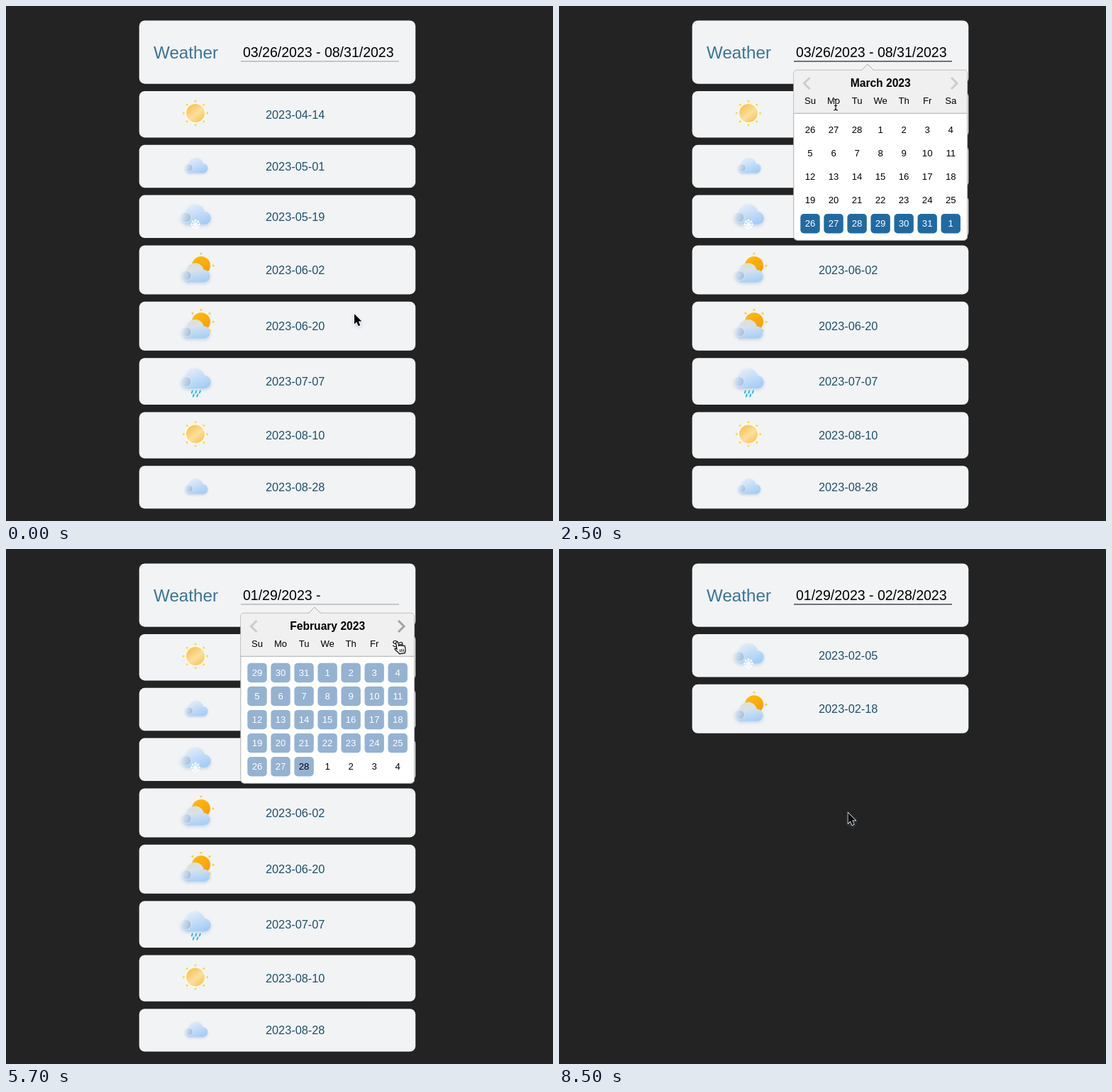
An HTML page that plays this animation: 771 by 726 pixels, repeating every 8600 ms.

```html
<!DOCTYPE html>
<html lang="en">
<head>
<meta charset="utf-8">
<title>Weather date range</title>
<style>
  html, body { margin: 0; width: 100%; height: 100%; overflow: hidden; background: #232323; }
  svg { display: block; width: 100%; height: 100%; font-family: "Liberation Sans", Arial, sans-serif; }
  .card { fill: #f1f3f5; }
  .date { font-size: 16.3px; fill: #1f5066; }
  .title { font-size: 24.2px; fill: #3a7595; }
  .range { font-size: 19.5px; }
  .month { font-size: 15.6px; font-weight: bold; text-anchor: middle; }
  .day { font-size: 13.1px; text-anchor: middle; }
  .line { fill: none; stroke: #000; }
  .shadow { filter: drop-shadow(0 2px 2px rgba(110, 150, 190, .35)); }
</style>
</head>
<body>
<svg viewBox="0 0 771 726">
  <defs>
    <linearGradient id="sunFill" x1=".1" y1="0" x2=".9" y2="1">
      <stop offset="0" stop-color="#f8bd45"/><stop offset=".55" stop-color="#fadf9f"/><stop offset="1" stop-color="#f8c04c"/>
    </linearGradient>
    <linearGradient id="hotFill" x1="0" y1="0" x2="1" y2="1">
      <stop offset="0" stop-color="#ffbe0a"/><stop offset="1" stop-color="#fd9a00"/>
    </linearGradient>
    <linearGradient id="cloudFill" x1=".2" y1="0" x2=".8" y2="1">
      <stop offset="0" stop-color="#e6eff9"/><stop offset="1" stop-color="#a0cbf6"/>
    </linearGradient>
    <linearGradient id="hazeFill" x1=".3" y1="0" x2=".6" y2="1">
      <stop offset="0" stop-color="#e2dfd0"/><stop offset=".4" stop-color="#d5e2ec"/><stop offset="1" stop-color="#a5cff8"/>
    </linearGradient>
    <linearGradient id="puffFill" x1="1" y1=".6" x2="0" y2=".3">
      <stop offset="0" stop-color="#9dbcdc"/><stop offset="1" stop-color="#dde8f2"/>
    </linearGradient>
  </defs>
  <g id="scene"></g>
</svg>
<script>
const LOOP = 8600, FRAME = 100;
const OPEN = 2000, PICK_START = 4000, PICK_END = 6900, NEXT = 4900;
const CLICKS = [1800, 2900, 3200, 3800, 4700, 6700];
const FOCUS = [[1900, 3000, 390], [PICK_START, 4800, 449.3], [PICK_END, LOOP, 547.5]];

// Pointer stops: time, x, y
const PATH = [
  [0, 491, 434], [900, 425, 80], [1100, 425, 80], [1600, 393, 72], [2000, 393, 72],
  [2500, 390, 138], [2850, 350, 108], [3400, 350, 108], [3750, 357, 300], [3900, 357, 300],
  [4100, 357, 184], [4200, 405, 167], [4600, 557, 108], [5600, 557, 108], [5700, 553, 130],
  [6400, 426, 301], [7300, 426, 301], [8000, 440, 250], [8100, 440, 250], [8500, 407.5, 372]
];

const BEFORE = [
  ['sun', '2023-04-14'], ['cloud', '2023-05-01'], ['snow', '2023-05-19'], ['partly', '2023-06-02'],
  ['bright', '2023-06-20'], ['rain', '2023-07-07'], ['sun', '2023-08-10'], ['cloud', '2023-08-28']
];
const AFTER = [['snow', '2023-02-05'], ['partly', '2023-02-18']];
const HEIGHT = { sun: 65.4, cloud: 60.4, snow: 60.4, partly: 69, bright: 69, rain: 65.8 };

const group = (x, y, content, more = '') => `<g transform="translate(${x} ${y}) ${more}">${content}</g>`;
const text = (x, y, cls, str, more = '') => `<text x="${x}" y="${y}" class="${cls}" ${more}>${str}</text>`;
const rect = (x, y, w, h, r, more) => `<rect x="${x}" y="${y}" width="${w}" height="${h}" rx="${r}" ${more}/>`;
const circle = (x, y, r, fill, more = '') => `<circle cx="${x}" cy="${y}" r="${r}" fill="${fill}" ${more}/>`;
const path = (d, more) => `<path d="${d}" ${more}/>`;

function rays(x, y, radius, angles, fill) {
  return angles.map(a => {
    const rad = a * Math.PI / 180;
    return circle(x + radius * Math.cos(rad), y + radius * Math.sin(rad), 1.5, fill);
  }).join('');
}

const cloud = (fill = 'cloudFill') => `<g class="shadow">
  ${path('M-11 11A9 9 0 0 1-13-6.5A13 13 0 0 1 12.5-7A9 9 0 0 1 13 11Z', `fill="url(#${fill})"`)}
  ${circle(-13, 1.5, 7, 'url(#puffFill)', 'stroke="#e4edf6" stroke-width=".8"')}</g>`;

function partly(angles) {
  return rays(8, -6, 17, angles, '#ffd02c') + circle(8, -6, 13, 'url(#hotFill)') +
    group(0, 6.8, cloud('hazeFill'), 'scale(.95)');
}

const flake = [0, 45, 90, 135].map(a =>
  `<path d="M-7 0H7M-5.5-1.8V1.8M5.5-1.8V1.8" stroke="#fff" stroke-width="1.3" transform="rotate(${a})"/>`).join('');
const drops = [[-5, 15], [.5, 15], [6, 15], [-3, 20], [2.5, 20]].map(([x, y]) =>
  path(`M${x + .8} ${y - 1.6}l-1 3`, 'stroke="#25b9dc" stroke-width="2" stroke-linecap="round"')).join('');

const ICONS = {
  sun: rays(0, -1.7, 16.7, [0, 45, 90, 135, 180, 225, 270, 315], '#fbdc35') +
    circle(0, -1.7, 15, '#fbf8ec') + circle(0, -1.7, 13, 'url(#sunFill)'),
  cloud: group(.8, 1, cloud(), 'scale(.76)'),
  snow: cloud() + group(0, 11, flake),
  partly: partly([0, 270]),
  bright: partly([0, 45, 225, 270, 315]),
  rain: group(0, -1, cloud()) + drops
};

function rows(list) {
  let y = 120;
  return list.map(([icon, date]) => {
    const h = HEIGHT[icon], mid = y + h / 2;
    const row = rect(187.7, y, 389.5, h, 8, 'class="card"') +
      group(267, mid, ICONS[icon]) + text(366, mid + 6, 'date', date);
    y += h + 10.4;
    return row;
  }).join('');
}

function pointerAt(t) {
  const i = PATH.findIndex(p => p[0] > t);
  if (i < 0) return PATH[PATH.length - 1].slice(1);
  const [t0, x0, y0] = PATH[i - 1], [t1, x1, y1] = PATH[i];
  const k = (t - t0) / (t1 - t0), e = k * k * (3 - 2 * k);
  return [x0 + (x1 - x0) * e, y0 + (y1 - y0) * e];
}

const colX = i => 354 + 33.03 * (i % 7);
const rowY = i => 174.5 + 33.05 * Math.floor(i / 7);

// Hover styles trail the pointer by one frame.
function hoveredDay(t) {
  const [x, y] = pointerAt(t - FRAME);
  for (let i = 0; i < 35; i++)
    if (Math.abs(x - colX(i)) < 13.7 && Math.abs(y - rowY(i)) < 13.7) return i;
  return -1;
}

function dayStyle(t, month, i, hover, previewEnd) {
  const selected = month === 2 ? i >= 28 : month === 0 && t >= PICK_START && i === 28;
  if (selected) return ['#206aa2', '#fff'];
  if (t >= NEXT) {
    if (i <= previewEnd) return ['#95b2d1', i === 30 ? '#000' : '#fff'];
    if (i === 30) return ['#bad9f1', '#000'];
  }
  return [i === hover ? '#efefef' : 'none', '#000'];
}

function calendar(t) {
  const month = t < 3100 ? 2 : t < 3400 ? 1 : t < NEXT ? 0 : 1;
  const first = 1 - new Date(2023, month, 1).getDay();
  const hover = hoveredDay(t);
  let previewEnd = 30;
  for (let s = NEXT; s <= t; s += FRAME) {
    const day = hoveredDay(s);
    if (day >= 0) previewEnd = day;
  }
  const [px, py] = pointerAt(t - FRAME);
  const chevron = (x, dir) => {
    const over = Math.abs(px - x) < 14 && Math.abs(py - 109) < 16;
    return path(`M${x - 4 * dir} 101l${8 * dir} 8l${-8 * dir} 8`,
      `fill="none" stroke="${over ? '#a3a3a3' : '#ccc'}" stroke-width="3"`);
  };
  let out = rect(330.8, 90.3, 244.8, 240, 5, 'fill="#fff" stroke="#aeaeae"') +
    path('M331.3 151V95.3q0-4.5 4.5-4.5H570.6q4.5 0 4.5 4.5V151Z', 'fill="#f0f0f0"') +
    path('M331 151.3H575.5', 'stroke="#aeaeae"') +
    path('M426 91L435 82L444 91', 'fill="#f0f0f0" stroke="#aeaeae"') +
    chevron(349.5, -1) + chevron(557, 1) +
    text(453.2, 113.8, 'month', ['January', 'February', 'March'][month] + ' 2023');
  ['Su', 'Mo', 'Tu', 'We', 'Th', 'Fr', 'Sa'].forEach((name, i) => out += text(colX(i), 138.3, 'day', name));
  for (let i = 0; i < 35; i++) {
    const [back, ink] = dayStyle(t, month, i, hover, previewEnd);
    out += rect(colX(i) - 13.7, rowY(i) - 13.7, 27.4, 27.4, 5, `fill="${back}"`) +
      text(colX(i), rowY(i) + 4.7, 'day', new Date(2023, month, first + i).getDate(), `fill="${ink}"`);
  }
  return out;
}

function header(t) {
  const range = t < PICK_START ? '03/26/2023 - 08/31/2023' :
    '01/29/2023 - ' + (t < PICK_END ? '' : '02/28/2023');
  const focus = FOCUS.find(([from, to]) => t >= from && t < to);
  const caret = focus && (t - focus[0]) % 1000 < 500;
  return rect(187.7, 20.4, 389.5, 89.3, 8, 'class="card"') +
    text(208, 74, 'title', 'Weather') + text(334, 72, 'range', range) +
    path('M331 78H554', `stroke="${focus ? '#70727a' : '#c5c6ca'}" stroke-width="2"`) +
    (caret ? path(`M${focus[2]} 54V76`, 'stroke="#000" stroke-width="1.3"') : '');
}

const BEAM = 'M-3-8Q0-8 0-5.5Q0-8 3-8M0-6V6M-3 8Q0 8 0 5.5Q0 8 3 8M-2 1.5H2';
const CURSORS = {
  arrow: path('M0 0V14.6L3.3 11.5L5.7 17.2L8.2 16.1L5.8 10.6H10.4Z',
    'stroke="#fff" stroke-width="1.4" paint-order="stroke" class="shadow"'),
  beam: group(0, 1, path(BEAM, 'fill="none" stroke="#fff" stroke-width="2.6"') +
    path(BEAM, 'class="line" stroke-width="1.2"')),
  hand: group(-2, 1, path('M-1.6 1.6a1.6 1.6 0 0 1 3.2 0V6.5a1.5 1.5 0 0 1 3 .3a1.5 1.5 0 0 1 2.9 .6a1.4 1.4 0 0 1 2.7 .6' +
    'V11.5Q10.2 14 8.6 17.2H1Q-.5 14.5-4.3 10.2Q-4.8 8.2-3.2 8.4L-1.6 10Z',
    'fill="#fff" stroke="#000" stroke-width="1.2"') +
    path('M2.4 11v4M4.8 11v4M7.2 11v4', 'class="line"'), 'rotate(-9)')
};

function pointer(t) {
  const [x, y] = pointerAt(t);
  const kind = t < 800 || t >= 7000 ? 'arrow' : t < 2700 ? 'beam' : 'hand';
  const click = CLICKS.find(c => t >= c && t < c + 200);
  const ring = click ? circle(0, 0, 17 + .14 * (t - click), 'none', 'stroke="#000" stroke-width="1.6"') : '';
  return group(x, y, CURSORS[kind] + ring);
}

const scene = document.getElementById('scene');
let shown = -1;
function tick(now) {
  const t = Math.floor(now % LOOP / FRAME) * FRAME;
  if (t !== shown) {
    shown = t;
    scene.innerHTML = rows(t < PICK_END ? BEFORE : AFTER) + header(t) +
      (t >= OPEN && t < PICK_END ? calendar(t) : '') + pointer(t);
  }
  requestAnimationFrame(tick);
}
tick(0);
</script>
</body>
</html>
```
